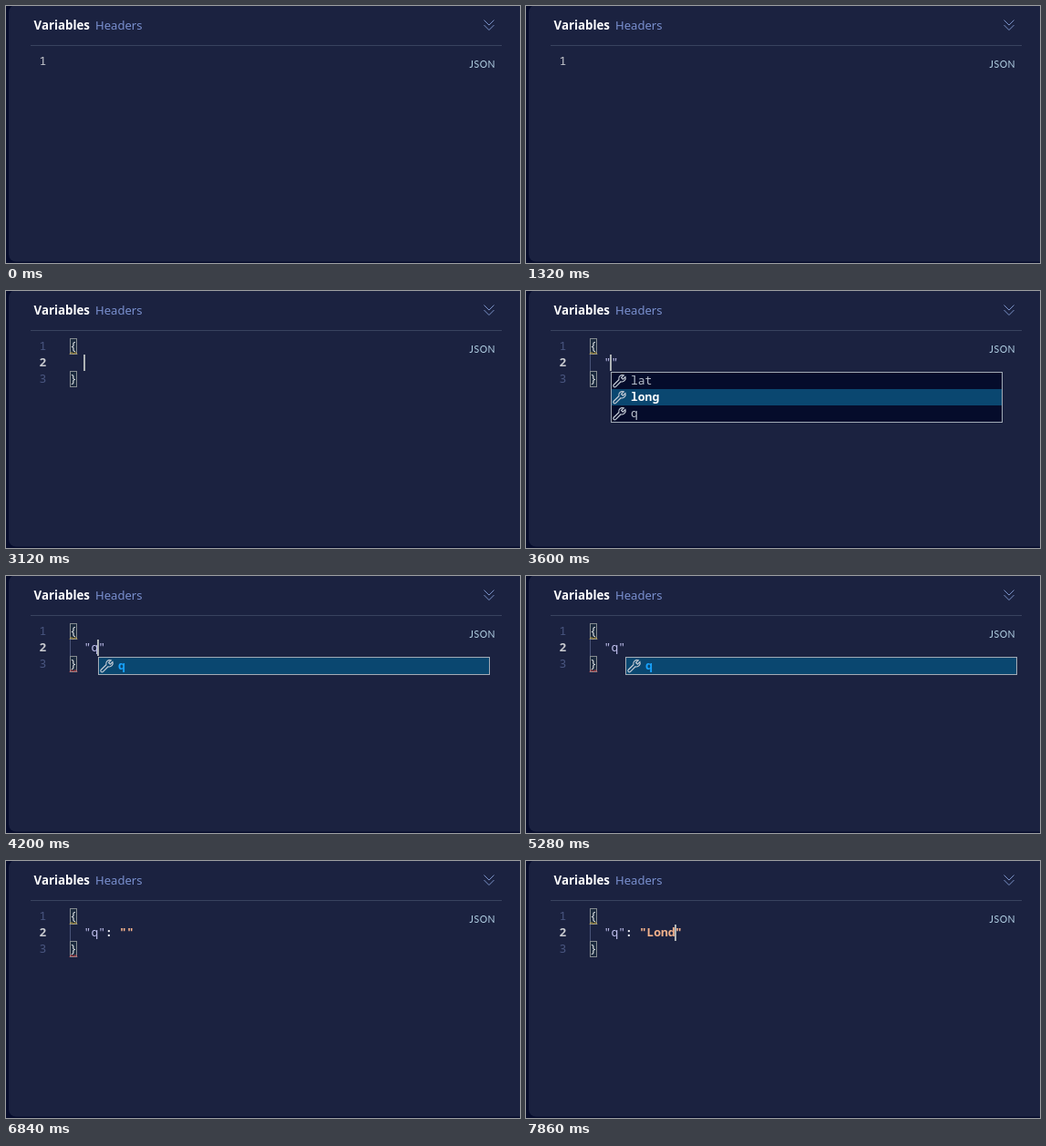
An HTML page for the animation above (8000 ms loop, 564 by 283 pixels).

```html
<!DOCTYPE html>
<html lang="en">
<head>
<meta charset="utf-8">
<title>Variables editor</title>
<style>
  html, body { margin: 0; width: 100%; height: 100%; overflow: hidden; background: #060c2c; }
  svg { display: block; width: 564px; height: 283px; }
  text { font-family: "Noto Sans", "Open Sans", sans-serif; }
  .m { font: 500 13px "Noto Sans Mono", "DejaVu Sans Mono", monospace; }
  .b { font-weight: 600; }
  .num { fill: #4a5781; }
  .num.now { fill: #c9cbd0; }
  .brace { fill: #dfe3e6; }
  .key { fill: #c3c2f0; }
  .colon { fill: #e8eaf0; }
  .str { fill: #f3b18b; }
  .item { fill: #b9c0cc; }
  .pick { fill: #fff; }
  .match { fill: #18a3ff; }
  .line { fill: none; }
</style>
</head>
<body>
<svg viewBox="0 0 564 283">
  <rect x="3" y="-1" width="580" height="282.5" rx="8" fill="#1b2240"/>
  <text x="30.5" y="26" font-size="13.3" font-weight="600" fill="#fff">Variables</text>
  <text x="98" y="26" font-size="13.1" fill="#7a90cf">Headers</text>
  <path class="line" stroke="#7b93c9" d="M524.5 15.5l5.5 5.5 5.5-5.5M524.5 21l5.5 5.5 5.5-5.5"/>
  <rect x="27" y="43" width="517" height="1" fill="#39435f"/>
  <text x="508.5" y="68" style="font: 10.5px Lato, sans-serif; letter-spacing: .5px" fill="#b4d2e6">JSON</text>
  <g id="editor"></g>
</svg>
<script>
const LOOP = 8000, LEFT = 70, TOP = 52, CHAR = 7.8, ROW = 18;
const editor = document.getElementById('editor');

// Each step changes part of the editor's state.
const steps = [
  [0, { lines: 1, row: 0, col: 0, caret: false, key: '', colon: '', value: '' }],
  [780, { caret: true }],
  [1320, { caret: false }],
  [1800, { braces: true, col: 1, caret: true }],
  [1860, { boxes: true }],
  [2160, { lines: 3, row: 1, col: 2 }],
  [2640, { caret: false }],
  [2700, { warning: true }],
  [3120, { caret: true }],
  [3600, { key: '""', col: 3, guide: true, popup: { x: 93, items: ['lat', 'long', 'q'], pick: 1 } }],
  [4020, { key: '"q"', col: 4 }],
  [4140, { popup: { x: 101, items: ['q'], pick: 0, match: true } }],
  [4200, { error: true }],
  [4680, { col: 5 }],
  [4800, { popup: { x: 109, items: ['q'], pick: 0, match: true } }],
  [5280, { caret: false }],
  [5460, { colon: ':', col: 6, caret: true, popup: null }],
  [5880, { col: 7 }],
  [6360, { value: '""', col: 8 }],
  [6840, { caret: false }],
  [6900, { error: false }],
  [7140, { value: '"L"', col: 9, caret: true }],
  [7380, { value: '"Lo"', col: 10 }],
  [7560, { value: '"Lon"', col: 11 }],
  [7860, { value: '"Lond"', col: 12 }]
];

const rowY = row => TOP + ROW * row;
const rect = (x, y, w, h, attrs) => `<rect x="${x}" y="${y}" width="${w}" height="${h}" ${attrs}/>`;
const text = (x, y, cls, str) => `<text x="${x}" y="${y + 13}" class="m ${cls}">${str}</text>`;
const code = (col, row, cls, str) => text(LEFT + CHAR * col, rowY(row), cls, str);
const squiggle = (row, color) =>
  `<path class="line" stroke="${color}" d="M70 ${rowY(row) + 17.5}l2-2 2 2 2-2 2 2"/>`;
const wrench = (x, y) => `<path class="line" stroke="#c3cad4" stroke-width="1.2" transform="translate(${x} ${y})"
  d="M12.2 1.9A4 4 0 0 0 6.9 6.7L1.3 12.2a1.4 1.4 0 0 0 2.2 2.2L9.1 8.8A4 4 0 0 0 14 3.6L11.4 6.2 9.6 4.4Z"/>`;

function brace(col, row, str, boxed) {
  const x = LEFT + Math.round(CHAR * col) + .5;
  return (boxed ? rect(x, rowY(row) + .5, 7, 17, 'fill="#1b2a3e" stroke="#858b90"') : '')
    + code(col, row, 'brace', str);
}

function popupBox({ x, items, pick, match }) {
  const y = 89;
  let out = rect(x + .5, y + .5, 429, items.length * ROW + 1, 'fill="#050c2b" stroke="#a3abb6"');
  items.forEach((name, i) => {
    const top = y + 1 + i * ROW, chosen = i === pick;
    if (chosen) out += rect(x + 1, top, 428, ROW, 'fill="#0a4770"');
    out += wrench(x + 2, top + 1);
    out += text(x + 22, top, match ? 'b match' : chosen ? 'b pick' : 'item', name);
  });
  return out;
}

function view(s) {
  let out = '';
  for (let i = 0; i < s.lines; i++) {
    const now = i === s.row;
    out += text(36.4, rowY(i), 'num' + (now ? ' now' : '') + (now && i ? ' b' : ''), i + 1);
  }
  if (s.guide) out += rect(LEFT, rowY(1), 1, ROW, 'fill="#4a5478"');
  if (s.braces) {
    const split = s.lines > 1;
    out += brace(0, 0, '{', s.boxes) + brace(split ? 0 : 1, split ? 2 : 0, '}', s.boxes);
  }
  if (s.warning) out += squiggle(0, '#d9b13b');
  if (s.error) out += squiggle(2, '#f14c4c');
  out += code(2, 1, 'key', s.key) + code(5, 1, 'b colon', s.colon) + code(7, 1, 'b str', s.value);
  if (s.caret) {
    const x = Math.max(LEFT, Math.floor(LEFT - .5 + CHAR * s.col));
    out += rect(x, rowY(s.row), 2, ROW, 'fill="#aeb3b5"');
  }
  return s.popup ? out + popupBox(s.popup) : out;
}

let shown = 0;
function frame(now) {
  const t = now % LOOP;
  const past = steps.filter(([time]) => time <= t);
  if (past.length !== shown) {
    shown = past.length;
    editor.innerHTML = view(Object.assign({}, ...past.map(([, change]) => change)));
  }
  requestAnimationFrame(frame);
}
frame(performance.now());
</script>
</body>
</html>
```
